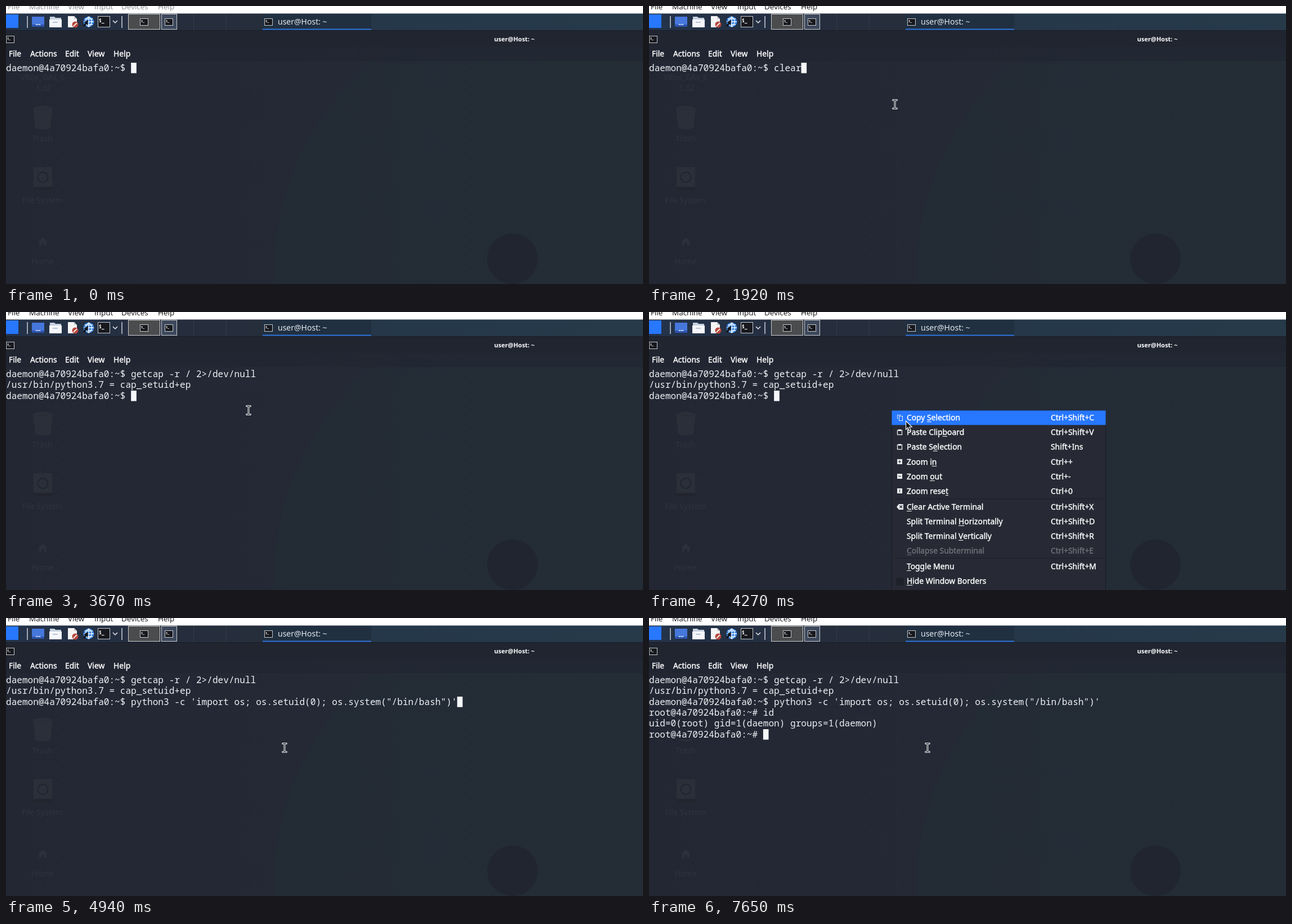
Recreate the animation shown at these times as an HTML page with a canvas. Size 1132 by 495 pixels, loop 8 s.

```html
<!DOCTYPE html>
<html lang="en">
<head>
<meta charset="utf-8">
<title>Terminal session</title>
<style>
html, body { margin: 0; width: 100%; height: 100%; overflow: hidden; background: #242935; }
canvas { display: block; }
</style>
</head>
<body>
<canvas id="stage" width="1132" height="495"></canvas>
<script>
const ctx = document.getElementById('stage').getContext('2d');
const LOOP = 8000, STEP = 200 / 3;
const COL = 9.66, ROW = 19.33, TOP = 101;
const UI = '13.85px "Noto Sans", sans-serif';
const MONO = '16.1px "Noto Sans Mono", monospace';

// Terminal contents; the block cursor follows the last line.
const PROMPT = 'daemon@4a70924bafa0:~$ ', ROOT = 'root@4a70924bafa0:~# ';
const SCAN = PROMPT + 'getcap -r / 2>/dev/null';
const FOUND = '/usr/bin/python3.7 = cap_setuid+ep';
const SHELL = PROMPT + `python3 -c 'import os; os.setuid(0); os.system("/bin/bash")'`;
const WHOAMI = 'uid=0(root) gid=1(daemon) groups=1(daemon)';
const screens = [
  [0, [PROMPT]],
  [1920, [PROMPT + 'clear']],
  [2320, [SCAN]],
  [2740, [SCAN, '']],
  [3330, [SCAN, FOUND]],
  [3400, [SCAN, FOUND, '']],
  [3470, [SCAN, FOUND, PROMPT]],
  [4880, [SCAN, FOUND, SHELL]],
  [5930, [SCAN, FOUND, SHELL, '']],
  [6000, [SCAN, FOUND, SHELL, ROOT]],
  [7320, [SCAN, FOUND, SHELL, ROOT + 'i']],
  [7450, [SCAN, FOUND, SHELL, ROOT + 'id']],
  [7590, [SCAN, FOUND, SHELL, ROOT + 'id', WHOAMI, '']],
  [7650, [SCAN, FOUND, SHELL, ROOT + 'id', WHOAMI, ROOT]],
];

// Centre y, label, index of the underlined letter, shortcut, icon
const menuItems = [
  [188, 'Copy Selection', 5, 'Ctrl+Shift+C', 'copy'],
  [214, 'Paste Clipboard', 10, 'Ctrl+Shift+V', 'paste'],
  [240, 'Paste Selection', 7, 'Shift+Ins', 'paste'],
  [267, 'Zoom in', 6, 'Ctrl++', '+'],
  [293, 'Zoom out', 5, 'Ctrl+-', '-'],
  [319, 'Zoom reset', 9, 'Ctrl+0', '1'],
  [347, 'Clear Active Terminal', 0, 'Ctrl+Shift+X', 'clear'],
  [373, 'Split Terminal Horizontally', 15, 'Ctrl+Shift+D'],
  [399, 'Split Terminal Vertically', 15, 'Ctrl+Shift+R'],
  [425, 'Collapse Subterminal', 0, 'Ctrl+Shift+E'],
  [453, 'Toggle Menu', 0, 'Ctrl+Shift+M'],
  [479, 'Hide Window Borders', 0, '', 'check'],
];

function rect(x, y, w, h, color) {
  ctx.fillStyle = color;
  ctx.fillRect(x, y, w, h);
}
function box(x, y, w, h, color, width = 1) {
  ctx.strokeStyle = color;
  ctx.lineWidth = width;
  ctx.strokeRect(x, y, w, h);
}
function disc(x, y, r, color) {
  ctx.fillStyle = color;
  ctx.beginPath();
  ctx.arc(x, y, r, 0, 7);
  ctx.fill();
}
function line(points, color, width = 1) {
  ctx.strokeStyle = color;
  ctx.lineWidth = width;
  ctx.stroke(new Path2D(points));
}
function shape(points, color) {
  ctx.fillStyle = color;
  ctx.fill(new Path2D(points));
}
function text(str, x, y, color = '#fff', font = UI, align = 'left') {
  ctx.font = font;
  ctx.fillStyle = color;
  ctx.textAlign = align;
  ctx.fillText(str, x, y);
}
// Interface text of medium weight
function label(str, x, y, color = '#fff') {
  text(str, x, y, color);
  ctx.strokeStyle = color;
  ctx.lineWidth = .4;
  ctx.strokeText(str, x, y);
}
function terminalIcon(x, y, w, h) {
  rect(x, y, w, h, '#17191e');
  box(x + .5, y + .5, w - 1, h - 1, '#c3c7cc');
  text('$_', x + 2, y + h * .55, '#fff', `bold ${h * .4}px "Noto Sans Mono", monospace`);
}

function drawWallpaper() {
  const fade = ctx.createLinearGradient(0, 0, 1132, 0);
  fade.addColorStop(0, '#232733');
  fade.addColorStop(.45, '#242935');
  fade.addColorStop(1, '#252d37');
  rect(0, 43, 1132, 452, fade);
  disc(980, 480, 505, 'rgba(36,48,54,.3)');
  disc(900, 450, 45, '#20252f');
}

function drawDesktopIcons(clearTo) {
  const caption = (str, y) => text(str, 65, y, '#2f343f', UI, 'center');
  ctx.save();
  ctx.beginPath();
  ctx.rect(0, clearTo, 1132, 495);
  ctx.clip();
  caption('VBox_GAs_6', 132);
  caption('.1.32', 151);
  shape('M48 181Q65 174 83 181L79 217Q65 223 52 217Z', '#2b2f39');
  line('M49 182Q65 187 82 182', '#272b35');
  caption('Trash', 241);
  rect(49, 287, 33, 41, '#2b2f39');
  rect(49, 322, 33, 6, '#22252e');
  ctx.strokeStyle = '#20242d';
  ctx.lineWidth = 2;
  ctx.beginPath();
  ctx.arc(65.5, 305, 9, 0, 7);
  ctx.stroke();
  caption('File System', 351);
  shape('M57 420L65.5 412L74 420H72V427H68V422H63V427H59V420Z', '#2b303d');
  caption('Home', 460);
  ctx.restore();
}

function drawPanel(focused) {
  const fade = ctx.createLinearGradient(0, 0, 1132, 0);
  fade.addColorStop(0, '#23334a');
  fade.addColorStop(.3, '#262d3c');
  fade.addColorStop(.4, '#262e3c');
  fade.addColorStop(.6, '#25384a');
  fade.addColorStop(1, '#263a4a');
  rect(0, 13, 1132, 30, fade);

  rect(0, 0, 1132, 13.4, '#fff');
  const names = [['File', 3], ['Machine', 41], ['View', 110], ['Input', 157], ['Devices', 205], ['Help', 270]];
  for (const [name, x] of names)
    text(name, x, 6, focused ? '#111' : '#8a8a8a', '13.5px "Open Sans", sans-serif');

  rect(0, 15, 22, 24, '#2777ff');
  rect(37, 18, 2, 21, '#a3a9b3');
  rect(205, 18, 2, 21, '#a3a9b3');

  rect(46, 19, 22, 18, '#4677dc');
  rect(46, 33, 22, 4, '#2d55b0');
  for (const x of [53, 56, 59]) rect(x, 32, 2, 2, '#dce6fa');

  shape('M78 19H86L88 21H98V25H78Z', '#c5cfdf');
  rect(77, 24, 22, 14, '#f5f7fb');
  rect(83, 28, 9, 2, '#b9c3d3');

  shape('M110 18H121L126 23V38H110Z', '#f4f4f4');
  shape('M121 18V23H126Z', '#c5c8cd');
  disc(123, 33, 5.5, '#b6463c');
  line('M120 36L126 30', '#f2e6df', 2);

  disc(147, 28, 9.5, '#2f7fe0');
  line('M138 28H156M140 23H154M140 33H154M147 19V37M147 19Q136 28 147 37M147 19Q158 28 147 37', '#eef6ff', 1.3);
  shape('M146 25L138 29L141 30L137 35L140 37L143 32L145 35Z', '#11151c');

  terminalIcon(163, 18, 22, 20);
  line('M190 26L194 30L198 26', '#e8ebef', 1.5);

  rect(218, 14, 56, 28, '#4b4c4d');
  box(217.5, 14.5, 56, 27, '#c8cacd');
  rect(276, 14, 28, 28, '#3d485c');
  box(276.5, 14.5, 27, 27, '#c8cacd');
  terminalIcon(238, 22, 15, 13);
  terminalIcon(282, 22, 15, 13);
  rect(333, 14, 1, 29, '#343b48');
  rect(391, 14, 1, 29, '#343b48');
  rect(456, 14, 193, 29, '#203041');
  rect(456, 40.5, 193, 2, '#2f73dc');
  terminalIcon(459, 22, 15, 13);
  text('user@Host: ~', 483, 33, '#e6e9ee', '14px "Noto Sans", sans-serif');
}

function drawWindowBars() {
  rect(0, 43, 1132, 30, '#202530');
  rect(0, 43, 1132, 1, '#191e28');
  rect(0, 73, 1132, 24, 'rgba(32,37,48,.5)');
  rect(0, 97, 1132, 1, '#20252f');
  terminalIcon(0, 53, 15, 13);
  text('user@Host: ~', 903.5, 63, '#fff', 'bold 11px "Noto Sans", sans-serif', 'center');
  const names = [['File', 5], ['Actions', 43], ['Edit', 105], ['View', 145], ['Help', 191]];
  for (const [name, x] of names) label(name, x, 90);
}

function drawTerminal(lines) {
  lines.forEach((str, i) => text(str, 0, TOP + 15 + i * ROW, '#eef0f4', MONO));
  const last = lines.length - 1;
  rect(lines[last].length * COL, Math.round(TOP + last * ROW), COL, 18.6, '#f6f8fb');
}

function drawMenuIcon(kind, y) {
  const ink = '#e8eaee';
  if (kind === 'copy') {
    line(`M441.5 ${y + 2.5}V${y - 4.5}H447.5`, ink);
    box(444.5, y - 2.5, 6, 8, ink);
  } else if (kind === 'paste') {
    box(441.5, y - 3.5, 8, 8, ink, 1.3);
    rect(443, y - 5, 5, 3, ink);
  } else if (kind === 'clear') {
    shape(`M440 ${y}L444 ${y - 5}H452V${y + 5}H444Z`, ink);
    line(`M445.5 ${y - 2.5}L450 ${y + 2}M450 ${y - 2.5}L445.5 ${y + 2}`, '#272a34', 1.4);
  } else if (kind === 'check') {
    rect(439, y - 6, 14, 14, '#1d2028');
    box(439.5, y - 5.5, 13, 13, '#20242d');
  } else if (kind) {
    rect(441, y - 5, 9, 9, ink);
    if (kind !== '1') rect(443, y - 1, 5, 1, '#272a34');
    if (kind !== '-') rect(445, y - 3, 1, 5, '#272a34');
  }
}

function drawMenu(selected) {
  rect(431, 175, 381, 320, '#272a34');
  box(431.5, 175.5, 380, 330, '#181b23');
  rect(436, 332, 371, 1, '#1c1f28');
  rect(436, 438, 371, 1, '#1c1f28');
  rect(431.4, 175.4 + selected * 26, 380.2, 25.8, '#2777ff');
  for (const [y, name, key, shortcut, icon] of menuItems) {
    const color = name.startsWith('Collapse') ? '#6f7279' : '#fff';
    drawMenuIcon(icon, y);
    label(name, 458, y + 5, color);
    const start = ctx.measureText(name.slice(0, key)).width;
    rect(458 + start, y + 7, ctx.measureText(name[key]).width, 1, color);
    label(shortcut, 714, y + 5, color);
  }
}

function drawBeam(x, y) {
  const beam = `M${x - 3} ${y - 7.5}H${x + 3}M${x} ${y - 7.5}V${y + 7.5}M${x - 3} ${y + 7.5}H${x + 3}`;
  ctx.lineCap = 'square';
  line(beam, '#f2f4f7', 3);
  line(beam, '#101319', 1);
  ctx.lineCap = 'butt';
}

function drawArrow(x, y) {
  const arrow = `M${x} ${y}v15l3.5 -3.3l2.6 6l2.6 -1.2l-2.6 -5.8h4.6Z`;
  shape(arrow, '#0d0f14');
  line(arrow, '#f4f5f7', 1.2);
}

const between = (t, from, to) => t >= from && t < to;
const progress = (t, from, to) => Math.min(1, Math.max(0, (t - from) / (to - from)));
const mix = (a, b, p) => a + (b - a) * p;

function pointerAt(t) {
  const tick = 330 + Math.floor((t - 330 + 5) / STEP) * STEP;
  if (t >= 4070) {
    const p = progress(tick, 4133, 4480);
    return [mix(431, 495, p), mix(175, 231, p)];
  }
  if (t >= 3670) return [431, 175];
  const p = 1 - (1 - progress(tick, 330, 730)) ** 2;
  const curve = (a, b, c) => mix(mix(a, b, p), mix(b, c, p), p);
  return [curve(752, 461, 437), curve(428, 338, 175)];
}

function draw(t) {
  const lines = screens.findLast(([start]) => t >= start)[1];
  const written = lines.filter(Boolean).length;
  const menuOpen = between(t, 4133, 4880);
  const [x, y] = pointerAt(t);

  drawWallpaper();
  drawDesktopIcons(written > 1 ? TOP + written * ROW : TOP);
  drawPanel(t >= 930);
  drawWindowBars();
  drawTerminal(lines);
  if (menuOpen) drawMenu(Math.floor((y - 175) / 26));

  const clicked = between(t, 930, 1060) || between(t, 4070, 4133) || between(t, 4810, 4940);
  if (clicked) disc(x, y, 14.5, 'rgba(225,210,20,.66)');
  if (menuOpen && t < 4810) drawArrow(x + 1.5, y - 2);
  else if (t >= 330) drawBeam(Math.round(x), Math.round(y));
}

const begin = performance.now();
function frame() {
  draw((performance.now() - begin) % LOOP);
  requestAnimationFrame(frame);
}
frame();
</script>
</body>
</html>
```
